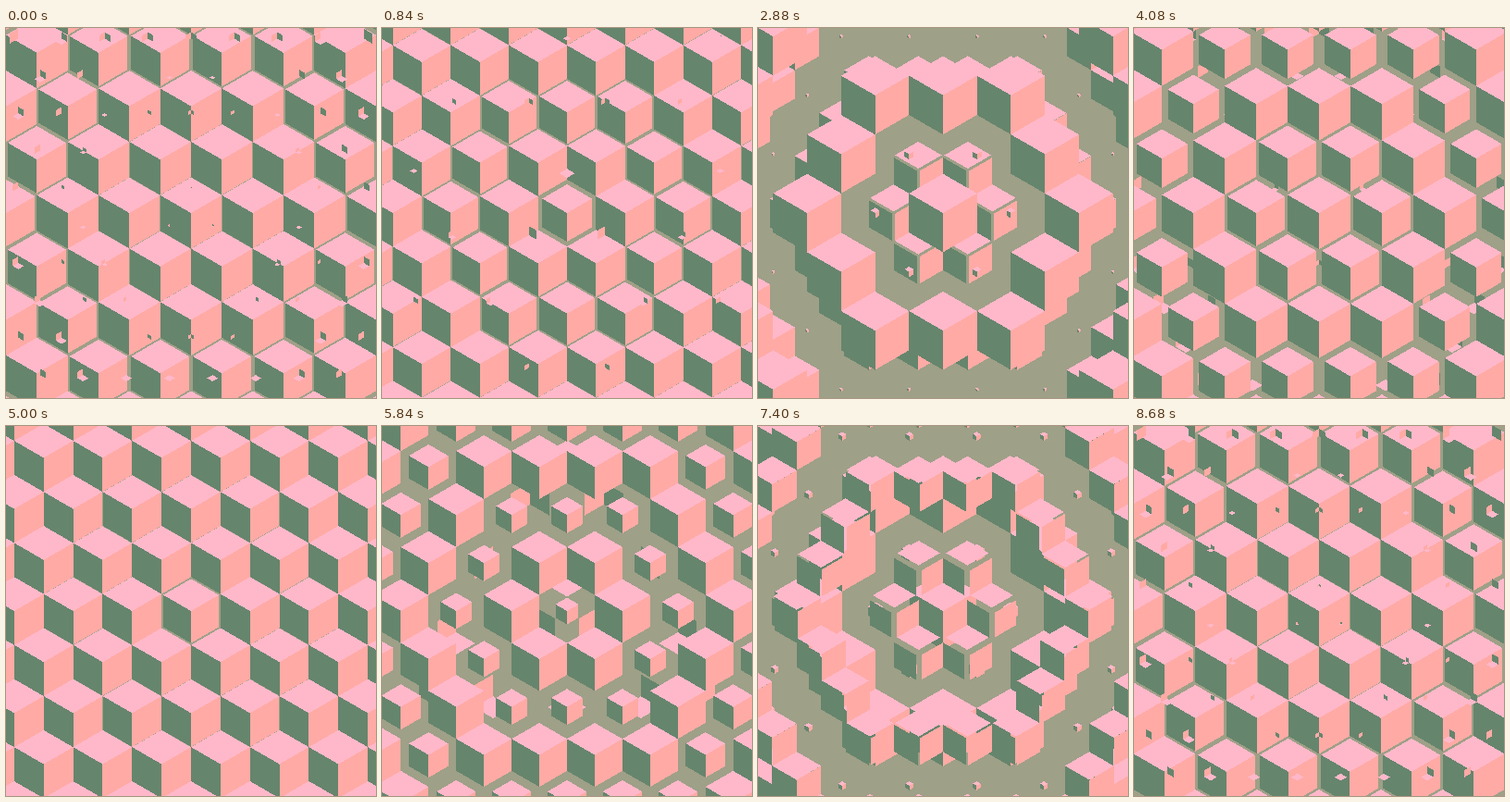
An HTML page with a canvas for the animation above (8720 ms loop, 400x400 px).

```html
<!DOCTYPE html>
<html lang="en">
<head>
<meta charset="utf-8">
<title>Breathing cubes</title>
<style>
html, body { margin: 0; width: 100%; height: 100%; overflow: hidden; background: #9ea087; }
canvas { display: block; width: 400px; height: 400px; }
</style>
</head>
<body>
<canvas id="c" width="400" height="400"></canvas>
<script>
const SIZE = 400, MID = 200, LOOP = 8720, HALF = LOOP / 2;
const GROW = 2100, LAG = 100;
const H = Math.sqrt(3) / 2;
const ctx = document.getElementById('c').getContext('2d');
const img = ctx.createImageData(SIZE, SIZE);
const px = new Uint32Array(img.data.buffer);

const rgb = (r, g, b) => (255 << 24 | b << 16 | g << 8 | r) >>> 0;
const BACK = rgb(158, 160, 135);
const TOP = rgb(255, 184, 202), LEFT = rgb(102, 133, 109), RIGHT = rgb(255, 170, 165);

const ease = u => u <= 0 ? 0 : u >= 1 ? 1 : (1 - Math.cos(Math.PI * u)) / 2;
const ramp = (age, start, ring) => ease((age - start - LAG * ring) / GROW);

// Fills one cube face, limited to lo..hi along both of its edges from the cube's front corner.
function face(kind, cx, cy, R, lo, hi) {
  const mid = (lo + hi) / 2, half = (hi - lo) / 2;
  const top = kind === TOP, side = kind === LEFT ? -1 : 1;
  const fx = top ? cx : cx + side * R * H * mid;
  const fy = top ? cy - R * mid : cy + R * mid / 2;
  const w = R * half * (top ? 2 * H : H);
  const h = R * half * (top ? 1 : 1.5);
  const x0 = Math.max(0, Math.floor(fx - w)), x1 = Math.min(SIZE - 1, Math.ceil(fx + w));
  const y0 = Math.max(0, Math.floor(fy - h)), y1 = Math.min(SIZE - 1, Math.ceil(fy + h));
  for (let y = y0; y <= y1; y++) {
    const dy = (y + 0.5 - cy) / R;
    for (let x = x0; x <= x1; x++) {
      const dx = (x + 0.5 - cx) / R / H;
      const a = top ? -dy - dx / 2 : side * dx;
      const b = top ? -dy + dx / 2 : dy + a / 2;
      if (a >= lo && a <= hi && b >= lo && b <= hi) px[y * SIZE + x] = kind;
    }
  }
}

function cube(x, y, R, lo, hi) {
  for (const kind of [TOP, LEFT, RIGHT]) face(kind, x, y, R, lo, hi);
}

// Even rings arrive as plates and leave as whole cubes; odd rings do the reverse.
function cell(x, y, R, ring, age) {
  const odd = ring % 2;
  const start = odd ? HALF / 2 + 100 : 210;
  const end = odd ? HALF * 1.5 + 290 : HALF + 320;
  const grown = ramp(age, start, ring), gone = ramp(age, end, ring);
  const f = gone > 0 ? 1 - gone : grown;
  if (f < 0.004) return;
  const plates = odd ? gone > 0 : gone === 0;
  if (plates) cube(x, y, R, 1 - f, 1);
  else cube(x, y, R * f, 0, 1);
}

function lattice(age) {
  const gap = 20 * (13 / 3 - age / HALF);
  const rows = Math.ceil(MID / gap / H) + 1;
  const cols = Math.ceil(MID / gap) + 1;
  for (let j = -rows; j <= rows; j++) {
    const r = Math.abs(j), shift = r % 2 / 2;
    for (let n = -cols; n <= cols; n++) {
      const i = n + shift;
      const ring = r + Math.max(0, Math.abs(i) - r / 2);
      cell(MID + i * gap, MID + j * gap * H, gap / (2 * H), ring, age);
    }
  }
}

function draw(now) {
  const time = now % LOOP, t = time % HALF;
  const front = time < HALF ? [0, 2] : [1];
  const behind = time < HALF ? [1] : [0, 2];
  px.fill(BACK);
  for (const k of [...behind, ...front]) lattice(t + k * HALF);
  ctx.putImageData(img, 0, 0);
}

const begin = performance.now();
function loop() {
  draw(Math.max(0, performance.now() - begin));
  requestAnimationFrame(loop);
}
loop();
</script>
</body>
</html>
```
